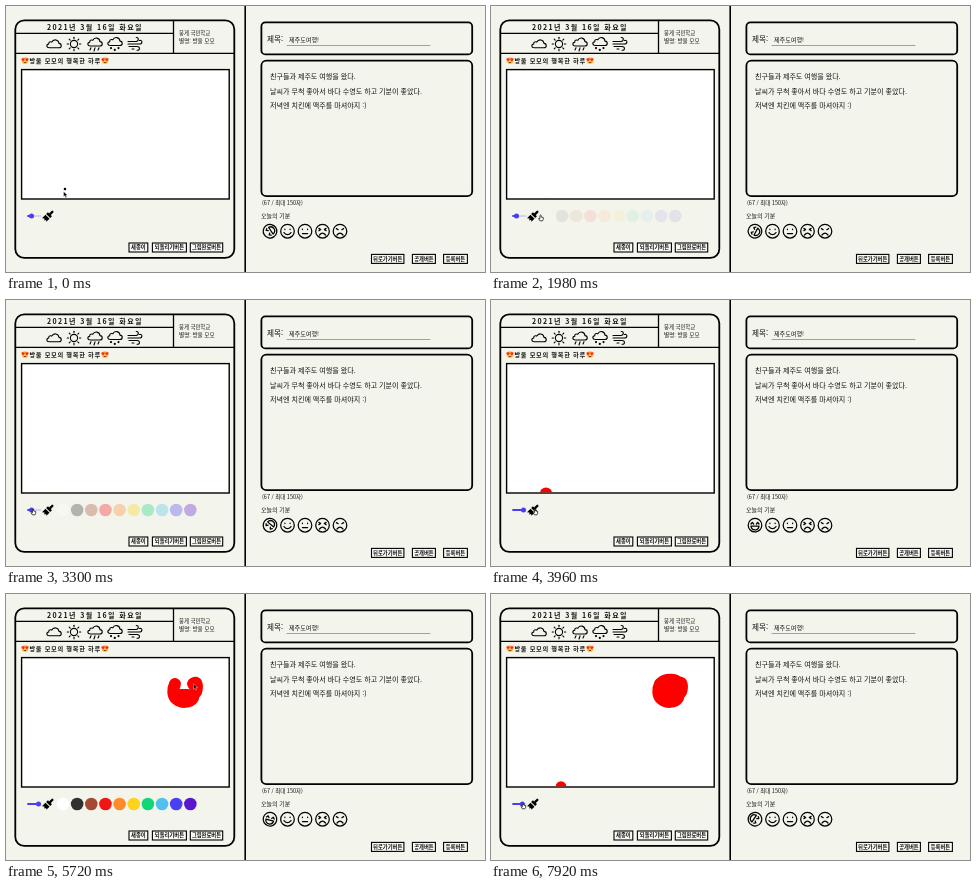
An HTML page for the animation above (8000 ms loop, 479x266 px).

```html
<!DOCTYPE html>
<html lang="ko">
<head>
<meta charset="utf-8">
<title>그림일기</title>
<style>
html, body { margin: 0; width: 100%; height: 100%; overflow: hidden; background: #f3f5ec; }
svg { display: block; width: 100vw; height: 100vh; }
text { font-family: "Noto Sans CJK KR", "Noto Sans CJK", sans-serif; fill: #111; white-space: pre; }
.line { fill: none; stroke: #000; stroke-linecap: round; stroke-linejoin: round; }
.hand { font-size: 7.05px; font-weight: 400; }
.rail { stroke-width: 2.2; stroke-linecap: round; }
.ink { fill: none; stroke: #f00; stroke-width: 12; stroke-linecap: round; stroke-linejoin: round; }
</style>
</head>
<body>
<svg viewBox="0 0 479 266" preserveAspectRatio="none">
  <defs>
    <clipPath id="paper"><rect x="16.3" y="64.3" width="206" height="127.9"/></clipPath>
    <g id="love">
      <circle r="3.4" fill="#ffc02e"/>
      <path id="heart" d="M-1.8 .8L-3.6 -1Q-3.6 -2.8 -1.9 -2Q-.3 -2.8 -.3 -1Z" fill="#f0283c"/>
      <use href="#heart" transform="scale(-1 1)"/>
      <path d="M-1.6 1.4H1.6Q0 3.6 -1.6 1.4Z" fill="#70301c"/>
    </g>
    <path id="cloud" d="M-4.5 3.5H4.8C8 3.5 8 -.7 5 -.9C4.6 -4.8 -.4 -5.8 -2.2 -2.2C-4.4 -3.2 -5.6 -1.6 -5.2 -.3C-8 .1 -7.8 3.5 -4.5 3.5Z"/>
  </defs>
  <rect width="479" height="266" fill="#f3f5ec"/>

  <g class="line" stroke-width="1.8">
    <rect x="9.3" y="14.3" width="219" height="237.6" rx="9"/>
    <path d="M9.5 27.3H167.5M9.5 47.3H228M167.5 14.3V47.3" stroke-width="1.3"/>
    <path d="M239.2 0V266" stroke-width="1.6"/>
    <rect x="255.4" y="16.4" width="210.8" height="32" rx="4"/>
    <rect x="255.4" y="54.6" width="210.8" height="135.6" rx="5"/>
    <path d="M281 39.5H424" stroke="#8b8d87" stroke-width=".8"/>
  </g>
  <rect x="15.6" y="63.6" width="207.6" height="129.4" fill="#fff" stroke="#000" stroke-width="1.4"/>

  <g class="line" stroke-width="1.1">
    <use href="#cloud" x="48" y="38.3"/>
    <g id="sun"></g>
    <use href="#cloud" x="89" y="36.5"/>
    <path d="M85 41.8L84 44M89 41.8L88 45M93 41.8L92 44"/>
    <use href="#cloud" x="109" y="36"/>
    <path d="M105 42V42.1M112.5 42V42.1M108.8 43.8V43.9" stroke-width="2.2"/>
    <path d="M122 35.5H130C133 35.5 133 31 130.2 31.5M122 38H133C137 38 136.5 33.5 133.5 34.5M123 40.5H131C134.5 40.5 134 45 131 44.2M126 43H128"/>
  </g>

  <text x="41" y="23.6" font-size="7" font-weight="700" letter-spacing="1.4">2021년 3월 16일 화요일</text>
  <text x="173" y="29.2" font-size="5.4">뭉게 국민학교</text>
  <text x="173" y="37.2" font-size="5.6">별명: 방울 모모</text>
  <use href="#love" x="19" y="54.6"/>
  <use href="#love" x="99" y="54.6"/>
  <text x="23.4" y="56.9" font-size="6.2" font-weight="700" letter-spacing=".72">방울 모모의 행복한 하루</text>

  <text x="261" y="35.6" font-size="7.6">제목:</text>
  <text x="283" y="35.6" font-size="6.1">제주도여행!</text>
  <text x="264" y="73" class="hand">친구들과 제주도 여행을 왔다.</text>
  <text x="264" y="87.6" class="hand">날씨가 무척 좋아서 바다 수영도 하고 기분이 좋았다.</text>
  <text x="264" y="102.2" class="hand">저녁엔 치킨에 맥주를 마셔야지 :)</text>
  <text x="256" y="199" font-size="5.5">(67 / 최대 150자)</text>
  <text x="255" y="212" font-size="6">오늘의 기분</text>

  <g id="buttons"></g>
  <g id="moods" class="line" stroke-width="1.25"></g>

  <g clip-path="url(#paper)">
    <path id="arc" class="ink" pathLength="1" d="M169 90C166.5 95 166.5 102 170.5 105C175 109 184 109 187 104C187 100 180 101 175 101C180 103 187 103 190 98C192 92 190.5 86 187.5 90"/>
    <path id="fill" class="ink" pathLength="1" d="M187.5 90C187 85 175 84 169.5 89.5L179 91L188 96L172 97L179 98"/>
    <circle id="dot"/>
  </g>

  <path d="M22.2 210H34.5" class="rail" stroke="#d3d5ea"/>
  <path id="track" class="rail" stroke="#4a3ff0"/>
  <circle id="thumb" cy="210" r="2.5" fill="#4a3ff0"/>
  <g transform="translate(42.4 209.8) rotate(45) scale(.84)">
    <rect x="-1.4" y="-8" width="2.8" height="6" rx="1.2"/>
    <rect x="-3.4" y="-2.6" width="6.8" height="3"/>
    <path d="M-3.4 1.5H3.4V6.8L1.6 5.4L.4 7.4L-1 5.6L-3.4 7.4Z"/>
  </g>
  <g id="palette"></g>
  <g id="cursor">
    <path id="arrow" d="M0 0V5.2L1.3 4.1L2.2 6.1L3.2 5.6L2.3 3.7H4Z" stroke="#fff" stroke-width=".4"/>
    <path id="finger" d="M-.6 .4Q0 -.5 .6 .4V2L2.7 2.5V4.2L2 5.8H-.7L-2 3.6L-1.4 3.1L-.6 3.8Z" fill="#fff" stroke="#000" stroke-width=".7"/>
  </g>
</svg>
<script>
const $ = id => document.getElementById(id);
const LOOP = 8000, SPIN = 1690, UPRIGHT = 3960;
const clamp = v => Math.max(0, Math.min(1, v));
const ramp = (t, a, b) => clamp((t - a) / (b - a));
const set = (id, attrs) => { for (const k in attrs) $(id).setAttribute(k, attrs[k]); };

// label, x, y, width
const buttons = [
  ['새종이', 123, 237, 18.8], ['되돌리기버튼', 146.4, 237, 34], ['그림완료버튼', 184.3, 237, 32.4],
  ['뒤로가기버튼', 365.5, 248.4, 32.4], ['공개버튼', 406.4, 248.4, 23], ['등록버튼', 437.6, 248.4, 23.8]
];
$('buttons').innerHTML = buttons.map(([label, x, y, w]) =>
  `<rect x="${x}" y="${y}" width="${w}" height="9" fill="#f8f9f4" stroke="#000" stroke-width="1.1"/>
   <text x="${x + w / 2}" y="${y + 6.4}" font-size="5.3" font-weight="700" text-anchor="middle">${label}</text>`).join('');

const eyes = 'M-2.6 -2V-1.6M2.6 -2V-1.6';
const frown = 'M-3 3.8Q0 .2 3 3.8';
const faces = [
  'M-4 -1.2L-2.7 -2.8L-1.4 -1.2M1.4 -1.2L2.7 -2.8L4 -1.2M-4 1H4Q3.4 4.8 0 4.8Q-3.4 4.8 -4 1Z',
  eyes + 'M-3.5 1.4Q0 5.6 3.5 1.4',
  eyes + 'M-2.6 2.4H2.6',
  frown + 'M-3.6 -2.8L-1.8 -1.7L-3.6 -.6M3.6 -2.8L1.8 -1.7L3.6 -.6',
  frown + 'M-3.6 -2.6L-1.8 -1.5M3.6 -2.6L1.8 -1.5'
];
$('moods').innerHTML = faces.map((d, i) =>
  `<g transform="translate(${264 + i * 17.5} 225.2)"><g id="mood${i}"><circle r="6.8"/><path d="${d}"/></g></g>`).join('');

let rays = '';
for (let i = 0; i < 8; i++) rays += `<path d="M0 -5.4V-6.8" transform="rotate(${i * 45})"/>`;
$('sun').innerHTML = '<circle r="3.6"/>' + rays;

const colors = ['#fff', '#303030', '#a34a30', '#f31414', '#ff8b2b', '#ffd21c', '#12d678', '#52c0ee', '#4a40f3', '#5a16cf'];
$('palette').innerHTML = colors.map((c, i) =>
  `<circle cx="${57 + i * 14.15}" cy="210" r="6.3" fill="${c}"/>`).join('');

// time, x, y
const before = [
  [0, 57.6, 185.5], [180, 54, 192], [500, 44, 206], [990, 44, 209], [1900, 44, 209],
  [2350, 75, 209], [2750, 103, 210], [2950, 103, 210], [3300, 27, 209], [3700, 32.5, 209],
  [3900, 44, 209], [4250, 44, 209], [4450, 55, 192], [5000, 169, 90]
];
const after = [
  [6400, 179, 98], [6650, 178, 95], [6930, 116, 156], [7120, 70, 192], [7400, 42, 208],
  [7700, 33, 209], [7880, 33, 209], [8000, 30, 209]
];

function along(stops, t) {
  let i = 1;
  while (i < stops.length - 1 && stops[i][0] < t) i++;
  const [t0, x0, y0] = stops[i - 1], [t1, x1, y1] = stops[i];
  const p = ramp(t, t0, t1);
  return { x: x0 + (x1 - x0) * p, y: y0 + (y1 - y0) * p };
}

function pointer(t) {
  if (t < 5000) return along(before, t);
  if (t >= 6400) return along(after, t);
  const path = $(t < 5720 ? 'arc' : 'fill');
  const p = t < 5720 ? ramp(t, 5000, 5720) : ramp(t, 5720, 6400);
  return path.getPointAtLength(path.getTotalLength() * p);
}

// The brush tip trails the pointer and stays where it left the paper.
function brush(t) {
  if (t < 150) return { x: 59 - t / 40, y: 183 + t * .07 };
  if (t < 4450) return { x: 55, y: 193.6 };
  if (t >= 7270) return { x: 70, y: 192.6 };
  return pointer(t >= 5000 && t < 6400 ? t : Math.max(4450, t - 150));
}

function reveal(id, p) {
  set(id, { 'stroke-dasharray': `${p} 2`, visibility: p > 0 ? 'visible' : 'hidden' });
}

function draw(t) {
  const tip = pointer(t), spot = brush(t);
  const size = ramp(t, 3300, 3700) - .5 * ramp(t, 7880, 8000);
  const knob = 25.5 + 7 * size;
  const open = t < 4000 ? ramp(t, 1900, 2900) * (1 - ramp(t, 3100, 3400))
    : ramp(t, 4150, 4450) * (1 - ramp(t, 7400, 7700));

  set('mood0', { transform: `rotate(${(t - UPRIGHT) / SPIN * 360})` });
  set('sun', { transform: `translate(${68 - 2.4 * Math.max(0, Math.sin(Math.PI * t / 990))} 38)` });
  set('palette', { opacity: open });
  set('track', { d: `M22.2 210H${knob}` });
  set('thumb', { cx: knob });
  set('dot', { cx: spot.x, cy: spot.y, r: 1.3 + 4.9 * size, fill: t < 2850 ? '#000' : '#f00' });
  reveal('arc', ramp(t, 5000, 5720));
  reveal('fill', ramp(t, 5720, 6400));

  const overTools = tip.y > 200;
  set('cursor', { transform: `translate(${tip.x} ${tip.y})` });
  set('arrow', { visibility: overTools ? 'hidden' : 'visible' });
  set('finger', { visibility: overTools ? 'visible' : 'hidden' });
}

const start = performance.now();
function tick() {
  draw((performance.now() - start) % LOOP);
  requestAnimationFrame(tick);
}
tick();
</script>
</body>
</html>
```
